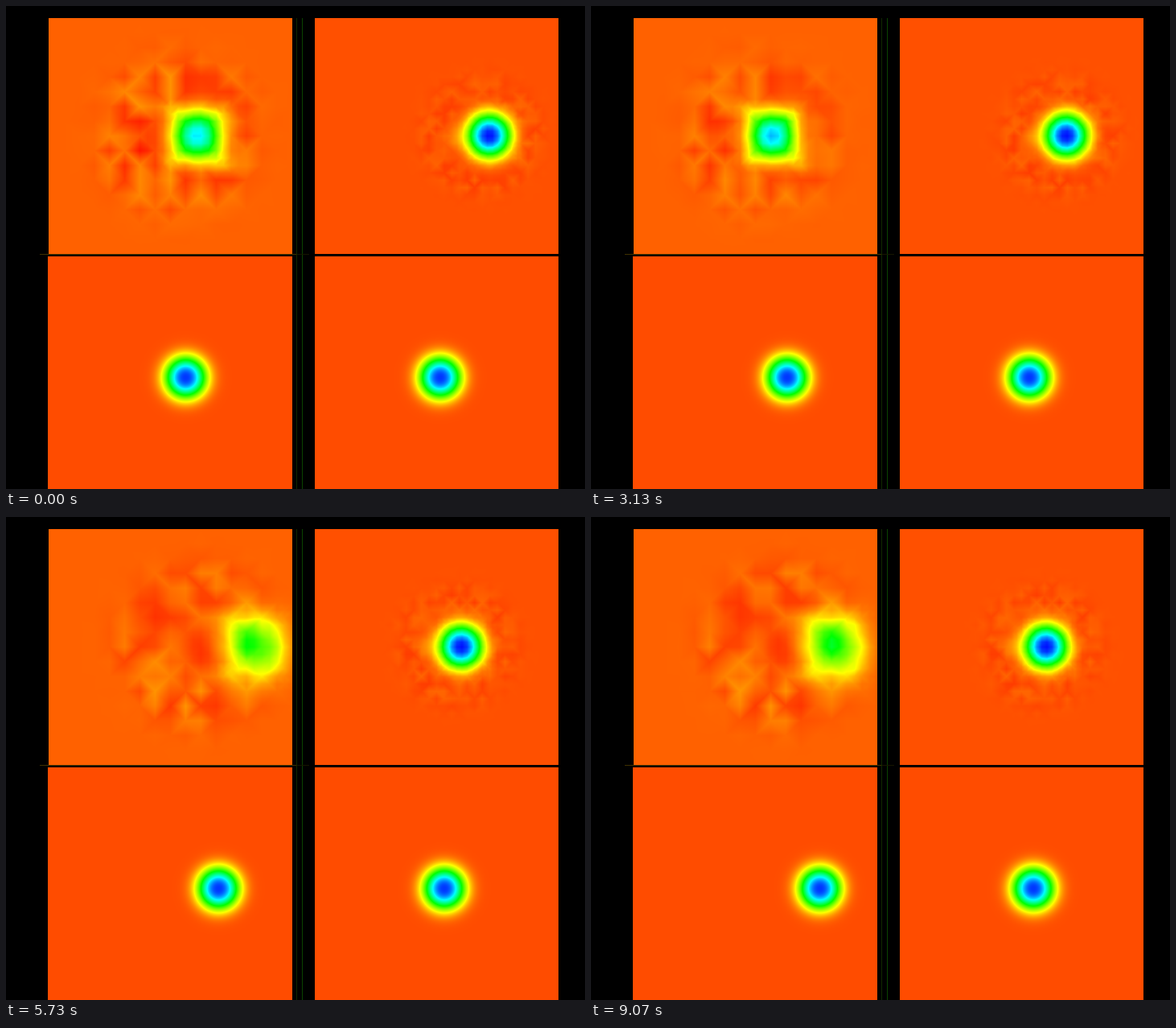
Write a matplotlib script that moves like this. It is 720 by 600 pixels and loops after 9110 ms.

```python
import numpy as np
import matplotlib.pyplot as plt
from matplotlib.animation import FuncAnimation

W, H = 720, 600
FRAMES, LOOP = 273, 9110

# Panel boxes: left, top, right, bottom
TL, TR = (53, 15, 356, 308), (384, 15, 687, 308)
BL, BR = (52, 311, 356, 600), (384, 311, 687, 600)
STEP = 5.1  # distance the vortex travels per solution step

rng = np.random.default_rng(4)
stage = np.zeros((H, W, 3), np.uint8)
cache = {}


def to_rgb(hue):
    """Fully saturated colour for a hue in degrees."""
    h = np.clip(hue, 0, 240) / 60
    rgb = np.stack([np.abs(h - 3) - 1, 2 - np.abs(h - 2), 2 - np.abs(h - 4)], -1)
    return (255 * np.clip(rgb, 0, 1)).astype(np.uint8)


def pixels(box):
    x0, y0, x1, y1 = box
    return np.meshgrid(np.arange(x0, x1) + 0.5, np.arange(y0, y1) + 0.5)


def nodes(box, n):
    x0, y0, x1, y1 = box
    return np.meshgrid(np.linspace(x0, x1, n + 1), np.linspace(y0, y1, n + 1))


def vortex(r, radius):
    return np.exp(-(r / radius) ** 2.4)


def facets(box, v, cell):
    """Interpolate node values linearly on triangles, diagonals alternating per cell."""
    n = len(v) - 1
    x0, y0, x1, y1 = box
    x, y = pixels(box)
    u, w = (x - x0) / (x1 - x0) * n, (y - y0) / (y1 - y0) * n
    i, j = u.astype(int), w.astype(int)
    fx, fy = u - i, w - j
    flip = (i // cell + j // cell) % 2
    near, far = i + flip, i + 1 - flip
    fx = np.where(flip == 1, 1 - fx, fx)
    a, b, c, d = v[j, near], v[j, far], v[j + 1, near], v[j + 1, far]
    return np.where(fx > fy, a + (b - a) * fx + (d - b) * fy,
                    a + (c - a) * fy + (d - c) * fx)


def wake(box, phase, s, cx, reach, width, amp):
    """Mesh noise in a ring around cx that changes slowly with the step."""
    x, y = nodes(box, len(phase) - 1)
    r = np.hypot(x - cx, y - 161)
    ring = np.exp(-((r - reach) / width) ** 2)
    v = amp * min(1, s / 5) * ring * np.sin(phase + 0.12 * s)
    return facets(box, v, 1)


PHASE_TL = rng.uniform(0, 2 * np.pi, (17, 17))
PHASE_TR = rng.uniform(0, 2 * np.pi, (33, 33))


def coarse(s):
    """Decaying, star-shaped vortex whose peak clings to the mesh nodes."""
    shift = STEP * s
    cx = 204.5 + shift - 3 * np.sin(2 * np.pi * shift / 37.9)
    x, y = nodes(TL, 32)
    r, a = np.hypot(x - cx, y - 161), np.arctan2(y - 161, x - cx)
    star = (0.25 - 0.006 * s) * np.sin(2 * a) ** 6 * np.clip(r / 49, 0, 1)
    hue = 23 + (195 - 5 * s) * vortex(r * (1 - star), 25 + 0.4 * s)
    hue -= min(1, s / 6) * 11 * vortex(np.hypot(x - cx + 68, (y - 165) / 1.4), 18)
    return (facets(TL, hue, 4)
            + wake(TL, PHASE_TL, s, 204.5 + 0.35 * shift, 68, 32, 13))


def medium(s):
    """Sharper vortex with a faint ring of ripples and a short tail."""
    cx = 536 + 5 * s
    x, y = nodes(TR, 48)
    r = np.hypot(x - cx, y - 161)
    hue = 19 + 218 * vortex(r, 25.5)
    hue += min(1, s / 6) * 9 * vortex(np.hypot(x - cx + 42, y - 163), 12)
    return facets(TR, hue, 3) + wake(TR, PHASE_TR, s, cx - 0.15 * STEP * s, 58, 20, 5)


def smooth(box, cx):
    x, y = pixels(box)
    return 18 + 209 * vortex(np.hypot(x - cx, y - 461.5), 25)


SOLVERS = (
    (TL, coarse),
    (TR, medium),
    (BL, lambda s: smooth(BL, 223.5 + STEP * s)),
    (BR, lambda s: smooth(BR, 540 + STEP * s)),
)


def steps(f):
    """Solution step shown in each panel: finer meshes advance more slowly."""
    return (int(((f - 71) % 102 + 0.5) // 5),
            int(((f - 45) % 100 + 2.8) // 4.25),
            (f + 16) // 23,
            (f + 12) // 100)


def panel(k, s):
    if (k, s) not in cache:
        cache[k, s] = to_rgb(SOLVERS[k][1](s))
    return cache[k, s]


stage[15:, 361] = 16, 40, 0
stage[15:, 368] = 10, 66, 0
stage[308, 42:361] = 62, 48, 0
stage[308, 362:377] = 22, 22, 0

fig = plt.figure(figsize=(W / 100, H / 100), dpi=100, facecolor="black")
ax = fig.add_axes([0, 0, 1, 1])
ax.axis("off")
view = ax.imshow(stage, aspect="auto", interpolation="nearest")


def update(f):
    img = stage.copy()
    for k, s in enumerate(steps(f)):
        x0, y0, x1, y1 = SOLVERS[k][0]
        img[y0:y1, x0:x1] = panel(k, s)
    view.set_data(img)
    return [view]


anim = FuncAnimation(fig, update, frames=FRAMES, interval=LOOP / FRAMES,
                     repeat=True, repeat_delay=0)
plt.show()
```
